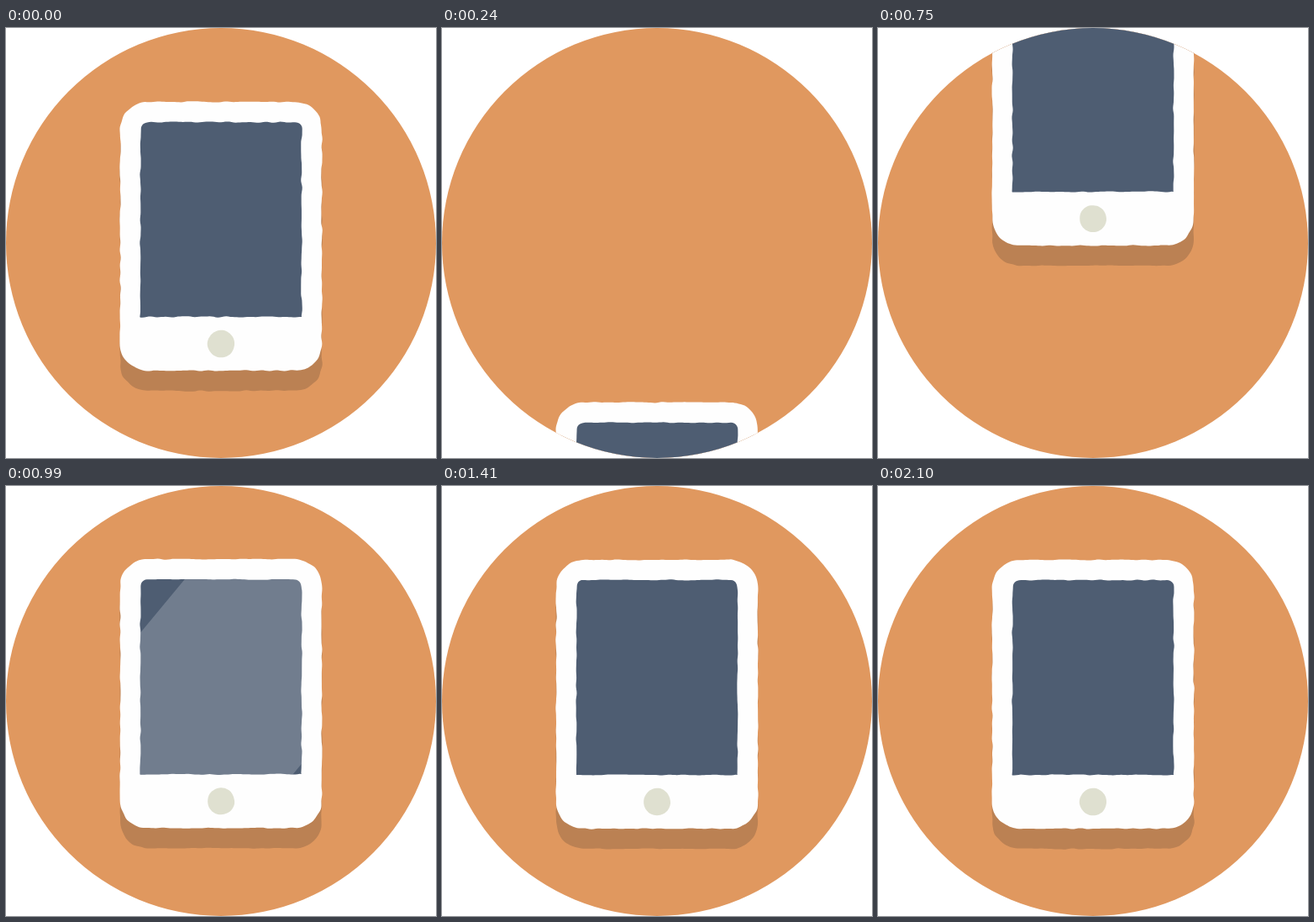
Write an HTML page with a canvas that moves like this. It is 512 px wide and 512 px high and loops after 2130 ms.

```html
<!DOCTYPE html>
<html lang="en">
<head>
<meta charset="utf-8">
<title>Tablet</title>
<style>
  html, body { margin: 0; width: 100%; height: 100%; overflow: hidden; background: #fff; }
  canvas { display: block; width: 100vw; height: 100vh; }
</style>
</head>
<body>
<canvas id="stage" width="512" height="512"></canvas>
<script>
const LOOP = 2130, STEP = 30, BOIL_STATES = 4, TRAVEL = 483;
const ctx = document.getElementById('stage').getContext('2d');

const clamp = v => Math.min(1, Math.max(0, v));
const smooth = v => v * v * (3 - 2 * v);
const ease = (t, start, length) => smooth(clamp((t - start) / length));
const mix = (a, b, k) => a + (b - a) * k;

function random(i, state, seed) {
  const v = Math.sin(i * 127.1 + state * 311.7 + seed * 74.7) * 43758.5453;
  return (v - Math.floor(v)) * 2 - 1;
}

// Rounded box outline as points with normals; radii run tl, tr, br, bl
function outline(x, y, w, h, radii, seed, rough) {
  const pts = [];
  const corners = [[x, y, 1, 1], [x + w, y, -1, 1], [x + w, y + h, -1, -1], [x, y + h, 1, -1]];
  let length = 0;
  const add = (px, py, a) => {
    const last = pts[pts.length - 1];
    if (last) length += Math.hypot(px - last.x, py - last.y);
    pts.push({ x: px, y: py, nx: Math.cos(a), ny: Math.sin(a), s: length });
  };
  corners.forEach(([cx, cy, sx, sy], i) => {
    const r = radii[i], from = Math.PI * (1 + i / 2);
    const ox = cx + sx * r, oy = cy + sy * r;
    const n = Math.max(1, Math.ceil(r * 1.57 / 2.5));
    for (let k = 0; k <= n; k++) {
      const a = from + Math.PI / 2 * k / n;
      add(ox + r * Math.cos(a), oy + r * Math.sin(a), a);
    }
    const [ex, ey, tx, ty] = corners[(i + 1) % 4];
    const nr = radii[(i + 1) % 4];
    const start = pts[pts.length - 1];
    const endX = i % 2 ? ex : ex + tx * nr;
    const endY = i % 2 ? ey + ty * nr : ey;
    const m = Math.round(Math.hypot(endX - start.x, endY - start.y) / 2.5);
    for (let k = 1; k < m; k++) {
      add(mix(start.x, endX, k / m), mix(start.y, endY, k / m), from + Math.PI / 2);
    }
  });
  length += Math.hypot(pts[0].x - pts[pts.length - 1].x, pts[0].y - pts[pts.length - 1].y);
  return { pts, length, seed, rough, cells: Math.round(length / 9) };
}

const shadow = outline(136, 112, 240, 320, [32, 32, 32, 32], 1, 0.8);
const body = outline(136, 88, 240, 320, [32, 32, 32, 32], 2, 0.8);
const screen = outline(160, 112, 192, 232, [8, 8, 0, 0], 3, 0.8);
const button = outline(240, 360, 32, 32, [16, 16, 16, 16], 4, 0.5);

// Slightly rough edge that drifts slowly and closes with the loop
function trace(shape, t) {
  const phase = t / LOOP * BOIL_STATES;
  const state = Math.floor(phase), blend = smooth(phase - state);
  const bump = i => mix(
    random(i % shape.cells, state % BOIL_STATES, shape.seed),
    random(i % shape.cells, (state + 1) % BOIL_STATES, shape.seed), blend * 0.6 + 0.2 * blend);
  ctx.beginPath();
  for (const p of shape.pts) {
    const u = p.s / shape.length * shape.cells, i = Math.floor(u);
    const d = shape.rough * mix(bump(i), bump(i + 1), smooth(u - i));
    ctx.lineTo(p.x + p.nx * d, p.y + p.ny * d);
  }
  ctx.closePath();
}

function paint(shape, t, color) {
  trace(shape, t);
  ctx.fillStyle = color;
  ctx.fill();
}

// Diagonal band parallel to the screen's rising diagonal
function glare(t) {
  const center = mix(-0.87, 2.87, ease(t, 673, 610));
  const left = 160 + (center - 0.836) * 192, right = 160 + (center + 0.836) * 192;
  const top = 102, bottom = 354, skew = 192 / 232;
  const shift = y => (y - 112) * skew;
  ctx.save();
  trace(screen, t);
  ctx.clip();
  ctx.beginPath();
  ctx.moveTo(left - shift(top), top);
  ctx.lineTo(right - shift(top), top);
  ctx.lineTo(right - shift(bottom), bottom);
  ctx.lineTo(left - shift(bottom), bottom);
  ctx.fillStyle = 'rgba(255,255,255,.2)';
  ctx.fill();
  ctx.restore();
}

const offset = t => t < 313
  ? TRAVEL * ease(t, 0, 360)
  : TRAVEL * (ease(t, 313, 693) - 1);

function draw(t) {
  ctx.clearRect(0, 0, 512, 512);
  ctx.save();
  ctx.beginPath();
  ctx.arc(256, 256, 256, 0, Math.PI * 2);
  ctx.fillStyle = '#e0985f';
  ctx.fill();
  ctx.clip();
  ctx.translate(0, offset(t));
  paint(shadow, t, '#bb8153');
  paint(body, t, '#fefefe');
  paint(screen, t, '#4e5d72');
  glare(t);
  paint(button, t, '#dfe0d0');
  ctx.restore();
}

function frame() {
  const t = performance.now() % LOOP;
  draw(Math.floor(t / STEP) * STEP);
  requestAnimationFrame(frame);
}
frame();
</script>
</body>
</html>
```
